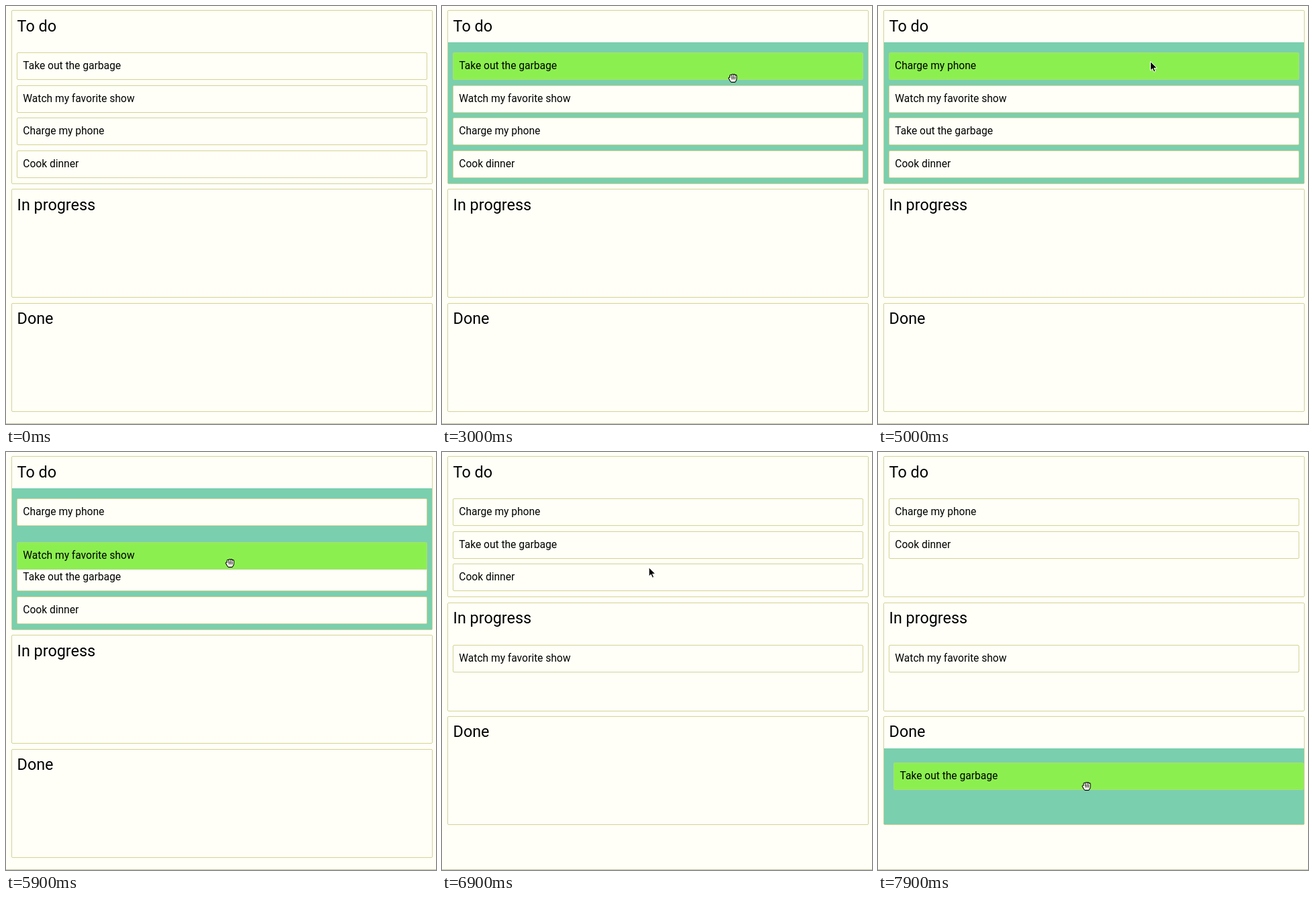
These frames come from a looping animation (640x622 px, 8000 ms). An HTML page:

```html
<!DOCTYPE html>
<html lang="en">
<head>
<meta charset="utf-8">
<title>Task board</title>
<style>
html, body { margin: 0; width: 100%; height: 100%; overflow: hidden; background: #fffff8; }
#board { position: relative; width: 640px; height: 622px; overflow: hidden; color: #000; font-family: Roboto, Arial, sans-serif; }
#board::after { content: ""; position: absolute; left: 0; top: 621px; width: 640px; height: 1px; background: #c4c4a0; }
.col, .item { position: absolute; box-sizing: border-box; border: 1px solid #d3d391; border-radius: 2px; }
.col { left: 8px; width: 627px; }
.col h3 { position: absolute; left: 7.6px; top: 9.5px; margin: 0; font: 400 23.35px/27px Roboto, Arial, sans-serif; white-space: nowrap; }
.list { position: absolute; left: 0; right: 0; top: 47px; bottom: 0; }
.over .list { background: #7acfae; }
.item { width: 611px; height: 41px; padding-left: 8.3px; background: #fffff8; font-size: 15.57px; line-height: 39px; white-space: nowrap; }
.item.held { background: #8bf04f; border-color: #a8dc80; z-index: 2; }
#cursor { position: absolute; left: 0; top: 0; width: 1px; height: 1px; overflow: visible; z-index: 3; }
#cursor g { display: none; stroke-linecap: round; stroke-linejoin: round; }
.line { fill: #000; stroke: #000; stroke-width: 3.8; }
.skin { fill: #fffff4; stroke: #fffff4; stroke-width: 1.7; }
.gap { stroke: #000; stroke-width: .9; }
</style>
</head>
<body>
<div id="board">
  <svg id="cursor">
    <defs>
      <path id="hand" d="M-4.2-4.6L-2.6 0M-1.3-6L-.7-1M1.8-6L1.6-1M4.9-4.2L4.2 0M-6.2 .8L-4 3M-3 .5H4.4V3L3 6H-2L-4 3Z"/>
      <path id="fist" d="M-2.6-3.4V0M0-4.2V0M2.5-4V0M4.8-3V1M-4.6 .4L-3 2M-2.8 .5H4.6V2.5L3 5H-1.6L-3.4 2.5Z"/>
    </defs>
    <g id="arrow"><path d="M0 0V13L3 10.2L5.2 15.2L7.4 14.2L5.3 9.4H9.4Z" stroke="#fff"/></g>
    <g id="open"><use href="#hand" class="line"/><use href="#hand" class="skin"/><path class="gap" d="M-.6 0V3M1.6 0V3"/></g>
    <g id="closed"><use href="#fist" class="line"/><use href="#fist" class="skin"/><path class="gap" d="M-.9-1V2M1.3-1V2M3.6-1V2"/></g>
  </svg>
</div>
<script>
const LOOP = 8000, STEP = 100, ROW = 48.67, LAG = 36;
const board = document.getElementById('board');
const cursor = document.getElementById('cursor');
const slot = i => 69 + ROW * i;
const clamp = v => Math.min(1, Math.max(0, v));
const glide = (t, start) => 1 - (1 - clamp((t - start) / 200)) ** 3;
const during = (t, spans) => spans.some(([a, b]) => t >= a && t < b);

// time, x, y of the pointer
const path = [
  [200, 523, 269], [300, 523, 269], [500, 498, 160], [700, 484, 107],
  [1700, 484, 107], [2100, 459, 105], [2300, 459, 105], [2400, 453, 94], [2500, 453, 94],
  [2800, 428, 103], [3000, 432.5, 107], [3100, 434, 112], [3500, 426, 197], [3800, 424, 183],
  [4000, 420, 164.5], [4300, 408, 140], [4500, 408, 139], [4900, 407, 84], [5100, 404, 82],
  [5300, 389, 81], [5600, 333, 141], [5800, 333, 143], [5900, 333, 165], [6200, 329, 320],
  [6300, 329, 342], [6600, 329, 343], [6900, 308, 172], [7100, 302, 142], [7300, 302, 146],
  [7500, 303, 363], [7600, 304, 410], [7900, 310, 497]
];
const arrowTimes = [[100, 400], [3500, 3800], [4900, 5300], [6300, 6600], [6800, 7000]];
const gripTimes = [[2800, 3500], [4400, 4900], [5700, 6300], [7200, LOOP]];

// drag: lift, release, landed, grab x, grab y, distance dropped
const items = [
  { text: 'Take out the garbage', y: slot(0), moves: [[5950, -ROW]],
    drags: [[3000, 3500, 3800, 431.6, 106, 2 * ROW], [7300, 9000, 9300, 302, 142, 0]] },
  { text: 'Watch my favorite show', y: slot(1),
    moves: [[3150, -ROW], [4650, ROW], [6610, -ROW], [7436, ROW], [7570, -ROW]],
    drags: [[5800, 6300, 6600, 333, 141, 336 - slot(1)]] },
  { text: 'Charge my phone', y: slot(2), moves: [[3300, -ROW]],
    drags: [[4500, 4900, 5300, 408, 139, -ROW]] },
  { text: 'Cook dinner', y: slot(3), moves: [[5950, -ROW], [7362, -ROW]], drags: [] }
];
const cols = [
  { text: 'To do', y: 6, h: 259, lift: 0, over: [[3000, 3800], [4500, 5300], [5800, 6100], [7300, 7400]] },
  { text: 'In progress', y: 272.4, h: 162, lift: 1, over: [[6100, 6600], [7400, 7600]] },
  { text: 'Done', y: 441.6, h: 162, lift: 1, over: [[7600, LOOP]] }
];

function add(cls, html) {
  const el = document.createElement('div');
  el.className = cls;
  el.innerHTML = html;
  board.insertBefore(el, cursor);
  return el;
}
cols.forEach(c => c.el = add('col', `<div class="list"></div><h3>${c.text}</h3>`));
items.forEach(i => i.el = add('item', i.text));

function pointer(t) {
  const n = path.findIndex(p => p[0] > t);
  if (n < 0) return path[path.length - 1].slice(1);
  if (!n) return [520, 286];
  const [a, ax, ay] = path[n - 1], [b, bx, by] = path[n];
  const k = (t - a) / (b - a);
  return [ax + (bx - ax) * k, ay + (by - ay) * k];
}

function place(item, t) {
  let x = 16, y = item.y, held = false;
  for (const [start, d] of item.moves) y += d * glide(t, start);
  for (const [lift, release, landed, gx, gy, drop] of item.drags) {
    if (t >= landed) y += drop;
    else if (t >= lift) {
      const [px, py] = pointer(Math.min(t, release) - LAG);
      const k = (1 - clamp((t - release) / (landed - release))) ** 4;
      x += (px - gx) * k;
      y += (py - gy) * k + drop * (1 - k);
      held = true;
    }
  }
  item.el.style.left = x + 'px';
  item.el.style.top = y + 'px';
  item.el.classList.toggle('held', held);
}

function draw(t) {
  const shrink = ROW * glide(t, 6610);
  for (const c of cols) {
    c.el.style.top = c.y - shrink * c.lift + 'px';
    c.el.style.height = c.h - shrink * (1 - c.lift) + 'px';
    c.el.classList.toggle('over', during(t, c.over));
  }
  items.forEach(i => place(i, t));
  const kind = t < 100 ? '' : during(t, gripTimes) ? 'closed' : during(t, arrowTimes) ? 'arrow' : 'open';
  for (const g of cursor.querySelectorAll('g')) g.style.display = g.id === kind ? 'inline' : 'none';
  const [x, y] = pointer(t);
  cursor.style.transform = `translate(${x}px, ${y}px)`;
}

// the picture advances ten times a second
const begin = performance.now();
function tick() {
  const t = performance.now() - begin + 5;
  draw(Math.floor(t / STEP) * STEP % LOOP);
  requestAnimationFrame(tick);
}
tick();
</script>
</body>
</html>
```
